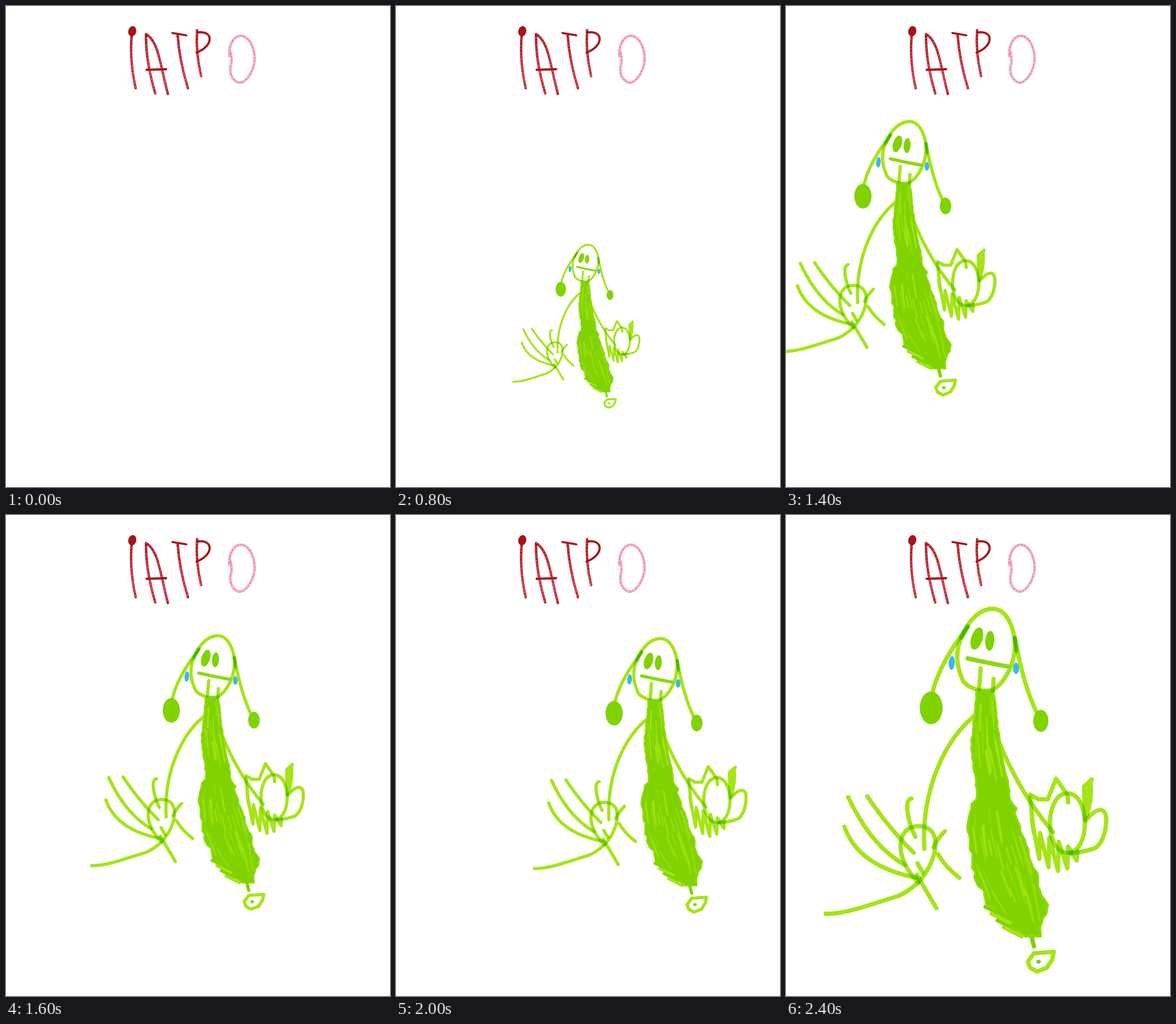
An HTML page that plays this animation: 669 px wide and 837 px high, repeating every 2900 ms.

```html
<!DOCTYPE html>
<html lang="el">
<head>
<meta charset="utf-8">
<style>
  html, body { margin: 0; height: 100%; overflow: hidden; background: #fff; }
  svg { display: block; }
  path, ellipse { stroke-linecap: round; stroke-linejoin: round; }
  .marker { mix-blend-mode: multiply; }
</style>
</head>
<body>
<svg width="669" height="837" viewBox="0 0 669 837">
  <defs>
    <clipPath id="crop"><rect x="60" y="190" width="390" height="490"/></clipPath>
    <linearGradient id="fade" gradientUnits="userSpaceOnUse" x1="0" y1="40" x2="0" y2="155">
      <stop offset=".1" stop-color="#a8131a"/>
      <stop offset=".75" stop-color="#cc2f40"/>
      <stop offset="1" stop-color="#b01c26"/>
    </linearGradient>
  </defs>
  <g id="title"></g>
  <g id="doll" clip-path="url(#crop)"></g>
</svg>
<script>
const LIME = '#a5e416', GREEN = '#80d300', BLUE = '#3fb6e4', RED = '#a8131a', PINK = '#f28fb0';
const title = document.getElementById('title');
const doll = document.getElementById('doll');

let seed = 7;
const random = (min, max) => {
  seed = seed * 16807 % 2147483647;
  return min + (max - min) * seed / 2147483647;
};
const mix = (a, b, k) => a + (b - a) * k;

function add(parent, tag, attrs) {
  const el = document.createElementNS('http://www.w3.org/2000/svg', tag);
  for (const key in attrs) el.setAttribute(key, attrs[key]);
  parent.append(el);
}
const stroke = (parent, d, color, width, more) =>
  add(parent, 'path', { d, fill: 'none', stroke: color, 'stroke-width': width, ...more });
const marker = d => stroke(doll, d, LIME, 5.6, { class: 'marker' });
const blob = (parent, color, cx, cy, rx, ry, turn = 0) =>
  add(parent, 'ellipse', { cx, cy, rx, ry, fill: color, transform: `rotate(${turn} ${cx} ${cy})` });

// Title: felt-pen stems fade and show grain, bars stay solid
const grain = (d, color) =>
  stroke(title, d, color, 1.6, { 'stroke-dasharray': '1 5 2 4', 'stroke-linecap': 'butt', opacity: .6 });
for (const d of ['M219 50Q215 95 226 143', 'M244 49Q243 95 260 152', 'M244 49C266 62 268 100 282 153',
                 'M299 50Q302 95 317 143', 'M333 42Q330 80 340 122']) {
  stroke(title, d, 'url(#fade)', 4.2);
  grain(d, '#f0a0ac');
}
for (const d of ['M245 111L279 110', 'M290 47L314 51', 'M334 46C362 42 362 70 332 81']) stroke(title, d, RED, 3.8);
blob(title, RED, 220, 44, 7, 9, 15);
const oval = 'M389 87C388 60 402 50 412 52C428 56 434 80 433 96C430 118 416 136 404 133C390 126 390 112 391 106Q395 96 391 80';
stroke(title, oval, PINK, 4);
grain(oval, '#fff');

// Head, hair and arms
[
  'M282 197C300 197 311 222 311 246C310 275 292 304 274 305C262 305 248 299 243 292C236 276 233 262 237 245C243 222 260 197 282 197',
  'M249 221Q212 268 203 306', 'M311 235Q322 297 340 334',
  'M249 220L241 235', 'M311 236L313 252',
  'M262 334C215 370 188 440 192 512', 'M288 366Q315 436 361 490'
].forEach(marker);

// Left hand
[
  'M184 556C150 522 156 482 184 482C218 482 210 528 184 556',
  'M92 444Q121 507 166 533', 'M117 443Q146 486 178 517', 'M87 483Q105 535 182 550',
  'M175 446C165 448 170 475 180 496', 'M204 510Q208 500 219 489', 'M210 519Q219 535 238 550',
  'M182 546L208 590', 'M50 596C80 602 120 585 157 574Q168 570 184 556', 'M183 531L190 543'
].forEach(marker);

// Right hand, with a zigzag of shrinking teeth under it
let teeth = 'M331 445L336 492 333 472';
for (let i = 0; i < 5; i++) {
  const x = 343 + 12.3 * i;
  teeth += `L${x} ${525 + 16 * Math.sin(i * .75)} ${x + 1} ${491 + 6 * i}`;
}
[
  'M380 439C410 439 411 517 380 517C349 517 350 439 380 439',
  'M331 441L342 447 354 447 365 420 380 441 381 451',
  'M403 472L402 430 412 421Q402 445 405 469Q413 445 410 424',
  'M404 475C420 455 431 458 431 474C431 490 425 506 416 511Q402 516 384 518',
  teeth
].forEach(marker);

// Face, pompoms and earrings
blob(doll, GREEN, 201, 327, 15, 21.5);
blob(doll, GREEN, 345, 344, 10, 14.5);
blob(doll, GREEN, 261, 236, 7.5, 15, 17);
blob(doll, GREEN, 278, 239, 6, 13, 4);
stroke(doll, 'M249 262Q275 268 303 273', '#8dd90d', 5.8);
blob(doll, BLUE, 228, 268, 4, 9, 4);
blob(doll, BLUE, 312.5, 275, 4, 7.5);

// Body: [y, left, right] at a few heights, filled with scribble
const girth = [[303, 261, 283], [380, 253, 292], [440, 262, 305], [456, 253, 310],
               [490, 248, 320], [540, 256, 337], [585, 275, 352], [629, 325, 345]];
function across(y, u) {
  const i = Math.max(1, girth.findIndex(row => row[0] >= y));
  const a = girth[i - 1], b = girth[i], k = (y - a[0]) / (b[0] - a[0]);
  return mix(mix(a[1], b[1], k), mix(a[2], b[2], k), u);
}
const left = [], right = [];
for (let y = 303; y <= 629; y += 6) {
  const rough = y > 440 ? 3 : 1;
  left.push([across(y, 0) + random(-rough, rough), y]);
  right.unshift([across(y, 1) + random(-rough, rough), y]);
}
add(doll, 'path', { d: 'M' + left.concat(right).join('L') + 'Z', fill: GREEN, stroke: '#92dc0a', 'stroke-width': 2.5 });
for (let i = 0; i < 48; i++) {
  const belly = i % 3, y = belly ? random(460, 575) : random(308, 385);
  const end = y + random(15, 48), u = random(.06, .94);
  stroke(doll, `M${across(y, u)} ${y}L${across(end, u)} ${end}`, LIME, random(1.5, 3.5), { opacity: random(.3, .9) });
}
for (let i = 0; i < 4; i++) {
  stroke(doll, `M${272 + 8 * i} ${588 + 9 * i}l24 12`, i % 2 ? LIME : GREEN, 5);
}
['M266 275L264 302', 'M283 289L282 304'].forEach(marker);

// Stem and ring
stroke(doll, 'M333 628L336 640', GREEN, 5.6);
marker('M328 660L336 649 362 647 360 657 353 668 340 673 331 668Z');
blob(doll, GREEN, 342, 660, 3, 2.7);

// Left, top and scale every 200 ms, held like snapshots; the swing to the right has half steps
const LOOP = 2900, STEP = 200;
const poses = [
  [275, 771, .222], [267, 710, .245], [250, 575, .393], [203, 413, .596], [183, 206, .813], [60, 193, 1],
  [-7, 197, 1], [147, 206, 1], [301, 252, 1], [239, 211, 1], [147, 211, 1], [66, 158, 1.326]
];
const begin = performance.now();
function draw() {
  const t = (performance.now() - begin) % LOOP;
  const hold = t >= 1400 && t < 1800 ? STEP / 2 : STEP;
  const at = Math.min(Math.floor(t / hold) * hold / STEP - 1, poses.length - 1);
  doll.setAttribute('visibility', at < 0 ? 'hidden' : 'visible');
  if (at >= 0) {
    const from = poses[Math.floor(at)], to = poses[Math.ceil(at)];
    const [x, y, s] = from.map((v, i) => mix(v, to[i], at % 1));
    doll.setAttribute('transform', `translate(${x} ${y}) scale(${s}) translate(-60 -193)`);
  }
  requestAnimationFrame(draw);
}
draw();
</script>
</body>
</html>
```
